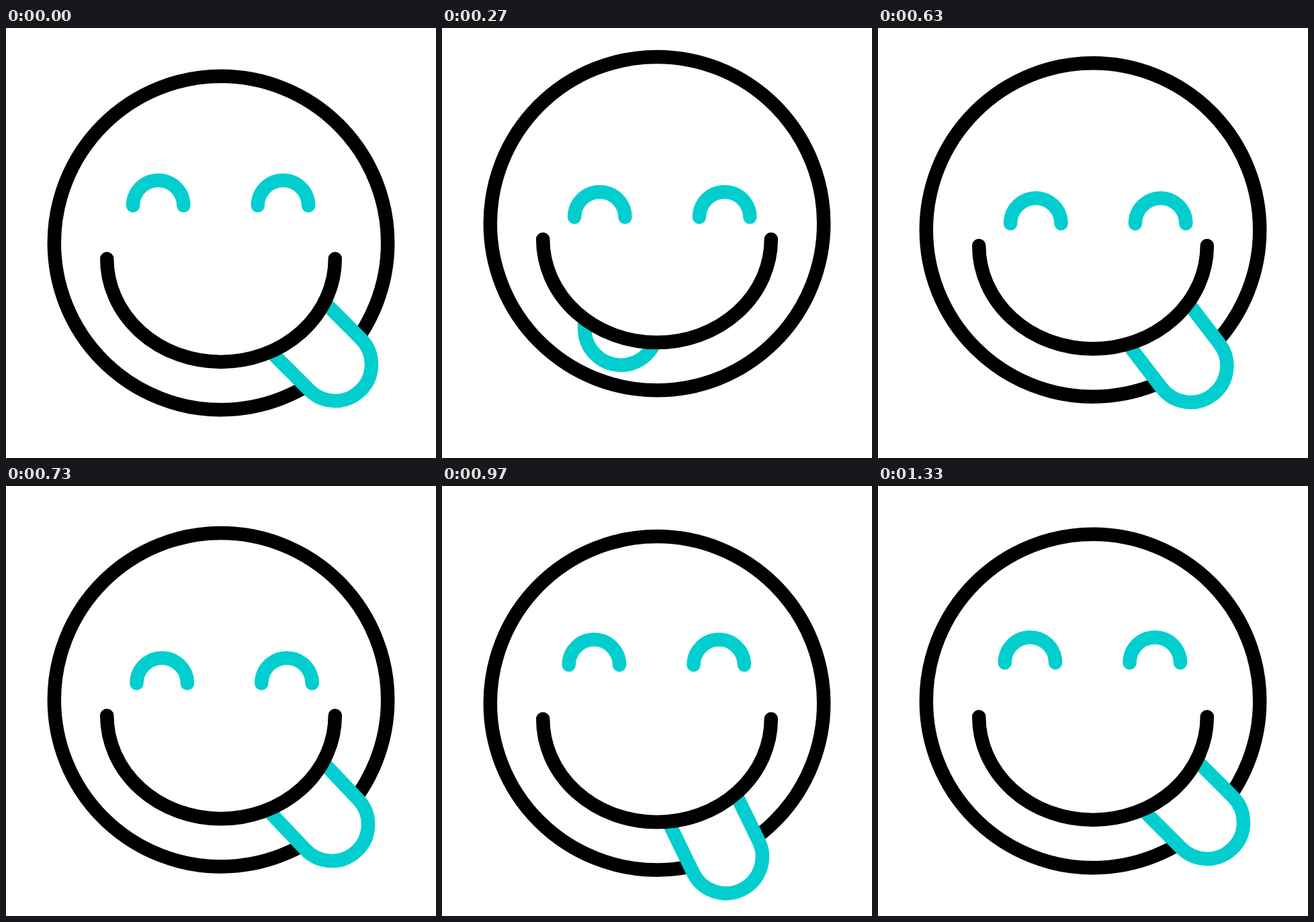
Write an HTML page that moves like this. It is 640 px wide and 640 px high and loops after 1670 ms.

```html
<!DOCTYPE html>
<html lang="en">
<head>
<meta charset="utf-8">
<title>Cheeky face</title>
<style>
  html, body { margin: 0; width: 100%; height: 100%; overflow: hidden; background: #fff; }
  svg { display: block; width: 100%; height: 100%; }
  path, circle { fill: none; stroke: #000; stroke-width: 20.5; stroke-linecap: round; }
  .teal { stroke: #02cecf; }
  .solid { fill: #fff; }
</style>
</head>
<body>
<svg viewBox="0 0 640 640">
  <g id="face">
    <circle cx="320" cy="320" r="248.2"/>
    <path id="tongue" class="teal solid" d="M-54.2 -110V0A54.2 54.2 0 0 0 54.2 0V-110"/>
    <path class="solid" d="M150.2 343.5A169.8 153.5 0 0 0 489.8 343.5"/>
    <g id="eyes">
      <path class="teal" d="M188.7 263a37.7 37.7 0 0 1 75.4 0M374.5 263a37.7 37.7 0 0 1 75.4 0"/>
    </g>
  </g>
</svg>
<script>
  const LOOP = 1670, LAST = 40, FPS = 30;

  const [face, eyes, tongue] = ['face', 'eyes', 'tongue'].map(id => document.getElementById(id));
  const place = (el, value) => el.setAttribute('transform', value);

  function draw(ms) {
    const step = Math.min(LAST, Math.floor((ms % LOOP + 3.5) * FPS / 1000));

    // Eased rise from 0 to 1 between two steps.
    const ramp = (from, to) => {
      const x = Math.min(1, Math.max(0, (step - from) / (to - from)));
      return x * x * (3 - 2 * x);
    };

    const lift = -41 * ramp(0, 12.5) + 45 * ramp(14, 24.3) - 4 * ramp(25, 40);
    const look = ramp(-0.8, 7.2) - ramp(19, 27);
    const tuck = ramp(0, 10) - ramp(10, 19);
    const swing = 45 * (1 - ramp(0, 8) + ramp(13, 21.1)) - 19 * (ramp(20.5, 29) - ramp(29, 38));

    place(face, `translate(0 ${lift})`);
    place(eyes, `translate(${8.4 * look} ${47.5 * look})`);
    place(tongue, `translate(313 324) rotate(${-swing}) translate(${-52 * tuck} ${250 - 109 * tuck})`);
  }

  const start = performance.now();
  function tick() {
    draw(performance.now() - start);
    requestAnimationFrame(tick);
  }
  tick();
</script>
</body>
</html>
```
